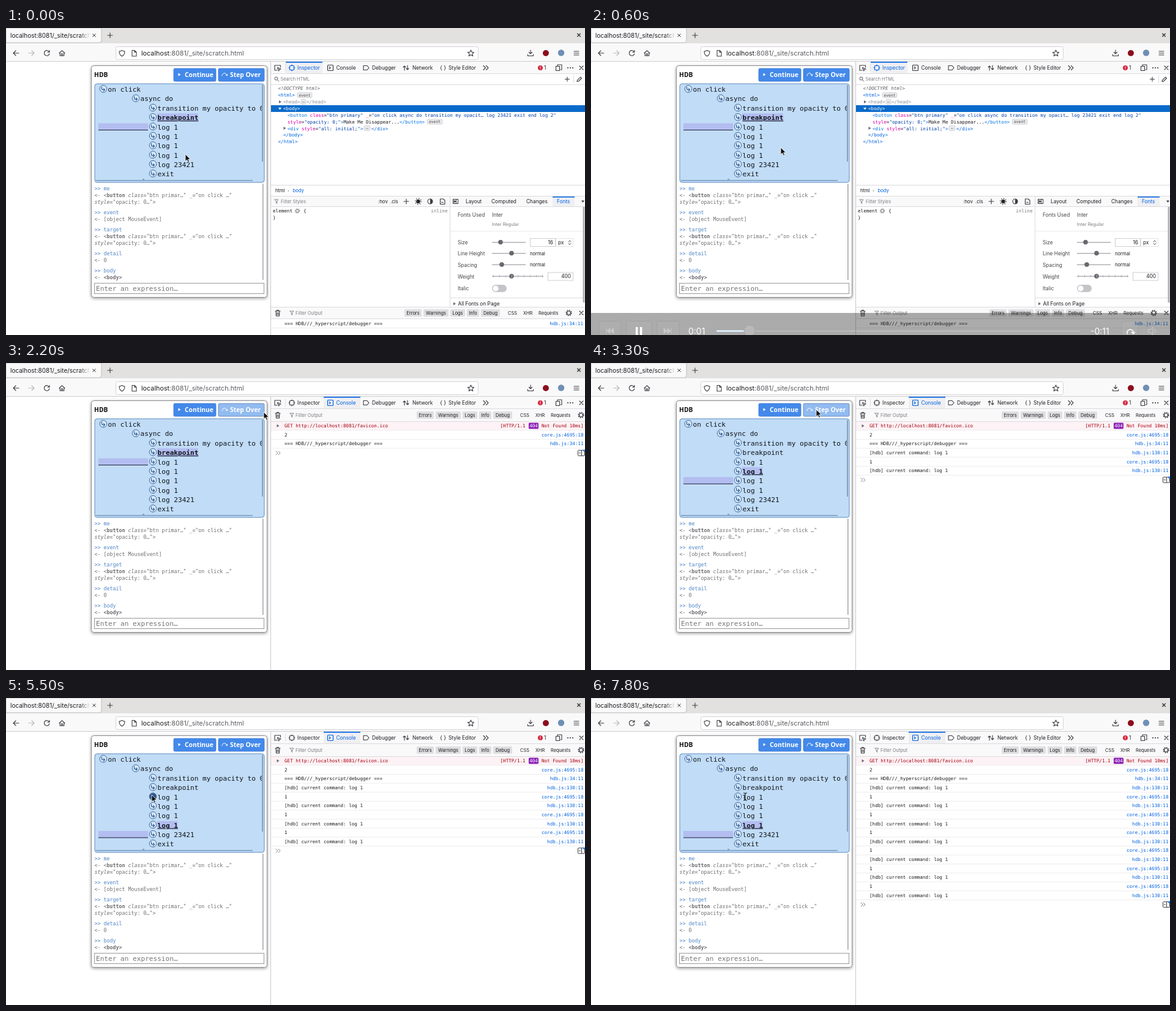
Recreate the animation shown at these times as an HTML page. Size 946 by 501 pixels, loop 8 s.

```html
<!DOCTYPE html>
<html lang="en">
<head>
<meta charset="utf-8">
<title>Debugger session</title>
<style>
html, body { margin: 0; width: 100%; height: 100%; overflow: hidden; background: #fff; }
svg { display: block; }
text { white-space: pre; font-family: Inter, sans-serif; }
.m { font-family: "DejaVu Sans Mono", monospace; }
.n { font-family: "Noto Sans", sans-serif; font-weight: 700; }
.b { font-weight: 700; }
.i { font-style: italic; }
.e { text-anchor: end; }
.c { text-anchor: middle; }
.tag { fill: #0074e8; } .attr { fill: #dd00a9; } .val { fill: #003eaa; }
.on { font-weight: 700; text-decoration: underline; }
</style>
</head>
<body>
<svg id="stage" width="946" height="501" viewBox="0 0 946 501"></svg>
<script>
const INK = '#1c1c20', GREY = '#7c7c82', LINE = '#dcdce0', BLUE = '#0061e0', BAR = '#f9f9fa';
const CODE = 11.1, LOG = 7.6, UI = 8.3, REPL = 8.3;

// y is the vertical middle of the text
const T = (x, y, size, s, fill = INK, cls = '', more = '') =>
  `<text x="${x}" y="${(y + size * .36).toFixed(2)}" font-size="${size}" fill="${fill}" class="${cls}" ${more}>${s}</text>`;
const R = (x, y, w, h, fill, more = '') => `<rect x="${x}" y="${y}" width="${w}" height="${h}" fill="${fill}" ${more}/>`;
const P = (d, stroke = '#3c3c42', w = 1.1, fill = 'none') =>
  `<path d="${d}" fill="${fill}" stroke="${stroke}" stroke-width="${w}" stroke-linecap="round" stroke-linejoin="round"/>`;
const C = (x, y, r, fill = 'none', stroke = '#3c3c42', w = 1.1) =>
  `<circle cx="${x}" cy="${y}" r="${r}" fill="${fill}" stroke="${stroke}" stroke-width="${w}"/>`;
const H = (x, y, w, fill = LINE) => R(x, y, w, 1, fill);
const G = (id, s, more = '') => `<g id="${id}" ${more}>${s}</g>`;
const S = (cls, s) => `<tspan class="${cls}">${s}</tspan>`;
const esc = s => s.replace(/</g, '&lt;').replace(/>/g, '&gt;');
const cross = (x, y, r, w = 1.1) => P(`M${x - r} ${y - r}l${2 * r} ${2 * r}m0 ${-2 * r}l${-2 * r} ${2 * r}`, '#3c3c42', w);
const plus = (x, y, r = 4) => P(`M${x - r} ${y}h${2 * r}M${x} ${y - r}v${2 * r}`);
const tri = (x, y, fill = '#6a6a70') => `<path d="M${x} ${y - 2.5}l4 2.5l-4 2.5z" fill="${fill}"/>`;
const triDown = (x, y, fill) => `<path d="M${x} ${y - 1.5}h5l-2.5 3.5z" fill="${fill}"/>`;
const funnel = (x, y) => P(`M${x} ${y - 3}h6l-2.3 3v3.4l-1.4-1v-2.4z`, GREY, .9);
const trash = (x, y) => P(`M${x - 4} ${y - 3}h8M${x - 1.5} ${y - 3}v-1.5h3v1.5M${x - 3} ${y - 3}l.5 8h5l.5-8M${x - 1} ${y - .5}v3.5m2-3.5v3.5`);
const gear = (x, y, r = 3, w = 1.5) => C(x, y, r, 'none', '#3c3c42', w * .8) +
  `<circle cx="${x}" cy="${y}" r="${r + 1.4}" fill="none" stroke="#3c3c42" stroke-width="${w}" stroke-dasharray="${(r + 1.4) * .393} ${(r + 1.4) * .393}"/>`;

function browser() {
  return R(0, 0, 946, 55, BAR) + R(0, 0, 946, 25, '#e2e1df') +
    `<path d="M0 0H156V20q0 4-4 4H0z" fill="${BAR}" stroke="#c0c0c2"/>` +
    T(7, 12, 10, 'localhost:8081/_site/scratch', INK, '', 'clip-path="url(#tabClip)"') +
    R(120, 3, 18, 18, 'url(#fade)') + cross(144, 12, 2.3, 1) + plus(170, 12) + cross(936, 11.5, 2.3, 1.5) +
    P('M21 41h-9m4-4l-4 4l4 4') + P('M37 41h9m-4-4l4 4l-4 4', '#b8b8bc') +
    P('M70.6 39a4.3 4.3 0 1 0 .3 3M71 36.5v3h-3') + P('M87 41l4.5-4.2L96 41M88.2 40.3v5h6.6v-5M90.5 45v-3h2v3') +
    R(179.5, 30.5, 592, 21, '#fff', 'rx="3" stroke="#d4d4d8"') +
    P('M189.5 36.5q2.5 1.6 4.5 1.6q0 6-4.5 8q-4.5-2-4.5-8q2 0 4.5-1.6z') +
    P('M206 36.5h4l3 3v6.5h-7zM210 36.5v3h3') + T(221, 41, 10.8, 'localhost<tspan fill="#5c5c62">:8081/_site/scratch.html</tspan>') +
    P('M759.5 36l1.5 3.4l3.7.3l-2.8 2.4l.9 3.6l-3.3-2l-3.3 2l.9-3.6l-2.8-2.4l3.7-.3z') +
    P('M857 36v6m-2.6-2.5l2.6 2.6l2.6-2.6M852.5 43v2.5h9v-2.5') +
    C(882, 41, 5, '#8c0d1c', 'none') + C(907, 40.5, 5.2, '#6f8fb5', 'none') +
    P('M928 38h8m-8 3h8m-8 3h8') + H(0, 54, 946, '#cfcfd3');
}

const CODE_ROWS = ['on click', 'async do', 'transition my opacity to 0', 'breakpoint', 'log 1', 'log 1', 'log 1', 'log 1', 'log 23421', 'exit'];
const rowY = i => 99.8 + i * 15.35;

function codeRow(s, i) {
  const x = i ? i > 1 ? 240 : 212 : 159, y = rowY(i);
  return `<circle id="dot${i}" cx="${x}" cy="${y - .5}" r="5.8" fill="#d3e6f9" stroke="#40699c"/>` +
    P(`M${x - 2.5} ${y - 3.5}v2.5q0 2 2 2h3m-2-2l2 2l-2 2`, '#2f5a90') +
    T(x + 7.6, y + .3, CODE, s, '#10151c', 'm', `id="row${i}"`);
}

function repl() {
  const out = (y, s) => T(144.5, y, REPL, s, '#6f6f74', 'm');
  const ask = (y, s) => T(144.5, y, REPL, '&gt;&gt; ' + s, '#4d85c6', 'm');
  const btn = y => out(y, `&lt;- &lt;${S('b', 'button')} ${S('i', 'class')}="btn primar…" _="on click …"`) +
    out(y + 11, `${S('i', 'style')}="opacity: 0…"&gt;`);
  return ask(262.5, 'me') + btn(273.5) + ask(301.5, 'event') + out(312.5, '&lt;- [object MouseEvent]') +
    ask(329.3, 'target') + btn(340.3) + ask(368, 'detail') + out(379, '&lt;- 0') +
    ask(396, 'body') + out(407, `&lt;- ${S('b', '&lt;body&gt;')}`);
}

function hdb() {
  return R(139.5, 61.5, 287, 378, '#fff', 'rx="4" stroke="#8d8d90" filter="url(#shadow)"') +
    T(144, 76, 10.3, 'HDB', '#111', 'n') +
    R(274, 66, 69, 21, '#4389ea', 'rx="2" stroke="#3c78cc" stroke-width=".8"') +
    tri(281.5, 76, '#fff') + T(292, 76.5, 10.3, 'Continue', '#fff', 'n') +
    R(347, 66, 75, 21, '#4389ea', 'id="step" rx="2" stroke="#3c78cc" stroke-width=".8"') +
    P('M353 78a4 4 0 0 1 8-.5m-2-1l2.2 1.6l1-2.4', '#fff', 1) + T(366, 76.5, 10.3, 'Step Over', '#fff', 'n') +
    R(145, 91, 277, 161, '#c1dcf6', 'rx="4" stroke="#5d8cc0"') +
    G('hl', R(151, 9.7, 81, 11.5, '#b3bdf0') + H(151, 20.2, 81, '#20243c') + R(247, -6.5, 10, 13, '#b3bdf0', 'id="mark"')) +
    G('rows', CODE_ROWS.map(codeRow).join(''), 'clip-path="url(#codeClip)"') +
    R(418, 93, 2, 125, '#879fba') + R(147, 248, 256, 1.6, '#7d9dc2') + R(223, 246.5, 3, 1, '#4c6f9c') +
    repl() + R(419, 254, 1.6, 157, '#a5a9ae') +
    R(144.5, 416.5, 277, 17, '#fff', 'stroke="#9a9a9e"') + T(147, 425, CODE, 'Enter an expression…', '#75757a', 'm');
}

function filterBar(y, dx) {
  const chips = [['Errors', 671, 28], ['Warnings', 702, 41], ['Logs', 746, 24], ['Info', 773, 20], ['Debug', 796, 31]];
  const plain = [['CSS', 840], ['XHR', 865], ['Requests', 890]];
  return trash(444, y) + funnel(464, y) + T(473, y, 7.5, 'Filter Output', GREY) +
    chips.map(([s, x, w]) => R(x - dx, y - 6, w, 12, '#dfdfe2', 'rx="1.5"') + T(x - dx + w / 2, y, 7.4, s, INK, 'c')).join('') +
    plain.map(([s, x]) => T(x - dx, y, 7.4, s)).join('') + gear(939.5 - dx, y);
}

function toolbar() {
  return R(433, 55, 513, 446, '#fff') + R(433, 55, 513, 19, BAR) + H(433, 74, 513) + R(432, 55, 1, 446, '#c9c9ce') +
    P('M443 69h-4v-8h9.5v3M443.5 64.5l5.5 2.3l-2.4.9l-.9 2.4z') + R(456, 58, 1, 13, LINE) +
    G('tab', R(0, 55, 60, 19, '#efeff2') + R(0, 55, 60, 1.7, '#0a6ae8')) +
    G('inspIcon', R(463.5, 61.5, 7, 7, 'none', 'rx="1" stroke-width="1.2"') +
      '<path d="M467 59.5v2m0 7v2m-5.5-5.5h2m7 0h2" stroke-width="1.2"/>') +
    T(476, 65, UI, 'Inspector', INK, '', 'id="inspTab"') +
    G('consIcon', R(525.5, 60.5, 9, 9, 'none', 'rx="1" stroke-width="1.2"') + '<path d="M528 63l2 2l-2 2" fill="none" stroke-width="1.2"/>') +
    T(539.5, 65, UI, 'Console', INK, '', 'id="consTab"') +
    P('M584 61.5h6l3 3.5l-3 3.5h-6z') + T(598, 65, UI, 'Debugger') +
    P('M651 69v-7m-2 2l2-2l2 2M656 61v7m-2-2l2 2l2-2') + T(664, 65, UI, 'Network') +
    T(709, 64.5, 9, '{ }') + T(723, 65, UI, 'Style Editor') + P('M780 61.5l3.5 3.5l-3.5 3.5m4.5-7l3.5 3.5l-3.5 3.5') +
    C(873, 65, 4, '#d7263d', 'none') + R(872.5, 62.5, 1, 3, '#fff') + R(872.5, 66.3, 1, 1, '#fff') + T(879, 65, UI, '1') +
    P('M901 62v-2h7v8h-2M898.5 62.5h6v7h-6z') + [918, 922, 926].map(x => C(x, 65, 1.1, '#3c3c42', 'none')).join('') + cross(940, 65, 3);
}

function tree() {
  const row = (x, i, s, fill = BLUE, cls = '') => T(x, 98.2 + i * 10.93, LOG, s, fill, 'm ' + cls);
  const tag = s => S('tag', esc(s)), at = (n, v) => S('attr', n) + '=' + S('val', `"${v}"`);
  const badge = (x, y, w, s) => R(x, y - 4, w, 8, '#ececef', 'rx="2" stroke="#c4c4ca" stroke-width=".7"') + T(x + w / 2, y - .2, 6.4, s, '#444', 'c m');
  return R(433, 126, 513, 11, '#0a6aca') +
    row(444.5, 0, '&lt;!DOCTYPE html&gt;', '#5c5c62', 'i') + row(444.5, 1, '&lt;html&gt;') + badge(476, 109.5, 24, 'event') +
    tri(446, 120.5) + row(453, 2, '&lt;head&gt;', '#8a8f99') + badge(482, 120.5, 8, '⋯') + row(491, 2, '&lt;/head&gt;', '#8a8f99') +
    triDown(445, 131.5, '#fff') + row(453, 3, '&lt;body&gt;', '#fff') +
    row(460, 4, `${tag('<button')} ${at('class', 'btn primary')} ${at('_', 'on click async do transition my opacit… log 23421 exit end log 2')}`, INK) +
    row(460, 5, `${at('style', 'opacity: 0;')}${tag('>')}Make Me Disappear...${tag('</button>')}`, INK) + badge(688, 153, 25, 'event') +
    tri(453.5, 163.5) + row(460, 6, `${tag('<div')} ${at('style', 'all: initial;')}${tag('>')}`, INK) + badge(585, 163.5, 10, '⋯') + row(597, 6, '&lt;/div&gt;') +
    row(453, 7, '&lt;/body&gt;') + row(444.5, 8, '&lt;/html&gt;');
}

function fontsPane() {
  const slider = (y, knob, w) => R(794, y - 1, w, 1.6, '#b4b4ba') + C(knob, y - .5, 3.8, '#68686e', 'none');
  const label = (y, s) => T(738, y, UI, s, '#45454a');
  const field = (x, y, w, s) => R(x + .5, y - 6.5, w, 13, '#fff', 'stroke="#cfcfd4"') + T(x + w - 3, y, UI, s, INK, 'e');
  const ticks = Array.from({ length: 9 }, (_, i) => R(796 + i * 10, 403, 1, 4, '#b4b4ba')).join('');
  return R(725, 274, 1, 181, LINE) + R(726, 275, 220, 16, BAR) + R(893, 275, 36, 16, '#efeff2') + R(893, 275, 36, 1.6, '#0a6ae8') +
    R(730.5, 279.5, 8, 7, 'none', 'stroke="#3c3c42"') + R(735, 280, 1, 6, '#3c3c42') + tri(731.7, 283, '#3c3c42') +
    T(751, 283.5, UI, 'Layout') + T(793, 283.5, UI, 'Computed') + T(850, 283.5, UI, 'Changes') + T(900, 283.5, UI, 'Fonts', BLUE) +
    triDown(940, 283, '#3c3c42') + H(726, 291, 220) +
    label(305.5, 'Fonts Used') + T(794, 305.5, UI, 'Inter', '#45454a') + T(794, 320, 7.3, 'Inter Regular', GREY) + H(726, 331, 217, '#ebebee') +
    label(350.5, 'Size') + slider(350, 808, 55) + field(856, 350, 41, '16') + R(898.5, 343.5, 28, 13, '#fff', 'stroke="#e4e4e8"') +
    T(902, 350.5, UI, 'px') + P('M919 349l2-2.2l2 2.2m-4 2.4l2 2.2l2-2.2', '#3c3c42', .9) +
    label(368.5, 'Line Height') + slider(368, 826, 55) + T(856, 368, 7.6, 'normal') +
    label(387, 'Spacing') + slider(386.5, 810, 55) + T(856, 386.5, 7.6, 'normal') +
    label(406, 'Weight') + slider(405.5, 826, 84) + ticks + field(885, 405.5, 41, '400') +
    label(425, 'Italic') + R(794, 419, 24, 12, '#c4c4c9', 'rx="6"') + C(800, 425, 4.6, '#fff', 'none') +
    H(726, 440, 217) + tri(731, 450) + T(738.5, 450.5, UI, 'All Fonts on Page') + R(942.5, 292, 3, 156, '#b0b0b5');
}

function inspector() {
  return C(441.5, 82.5, 2.4, 'none', GREY) + P('M443.5 84.5l2.3 2.5', GREY) + T(448.5, 83.7, 7.4, 'Search HTML', GREY) +
    plus(917, 83.5, 3.5) + R(927, 77, 1, 13, LINE) + P('M933 87.5l.6-2.3l5-5l1.8 1.8l-5 5z') + H(433, 92, 513) + tree() +
    H(433, 256, 513) + T(440, 265.3, 7.6, 'html') + T(460, 265, 7, '›', GREY) + T(468.5, 265.3, 7.6, 'body', BLUE) + H(433, 274, 513) +
    R(433, 275, 292, 16, BAR) + funnel(439, 283) + T(449, 283.3, 7.4, 'Filter Styles', GREY) + T(608, 283, 7.8, ':hov') + T(628, 283, 7.8, '.cls') +
    plus(654, 283) + C(673.5, 283, 2.8, '#222') + `<circle cx="673.5" cy="283" r="4.8" fill="none" stroke="#222" stroke-width="1.4" stroke-dasharray="1.2 2.57"/>` +
    C(693, 283, 4) + '<path d="M693 279a4 4 0 0 1 0 8z" fill="#3c3c42"/>' + P('M709.5 279h5l2.5 2.5v6h-7.5zM711.5 284.5h3') + H(433, 291, 292) +
    T(436, 298.5, LOG, 'element', INK, 'm') + gear(476, 298.5, 2.2, .9) + T(486, 298.5, LOG, '{', INK, 'm') +
    T(721.5, 298.5, LOG, 'inline', GREY, 'm e') + T(436, 309.5, LOG, '}', INK, 'm') + fontsPane() +
    R(433, 455, 513, 46, '#fff') + R(433, 456, 513, 18, BAR) + H(433, 455, 513) + filterBar(465, 20) + cross(940, 465, 3) + H(433, 474, 513) +
    T(455, 482, LOG, '=== HDB///_hyperscript/debugger ===', INK, 'm') + T(943, 482, LOG, 'hdb.js:34:11', BLUE, 'm e') + H(433, 489, 513, '#ededf0');
}

const LOG_ROWS = 16, logY = i => 102.4 + i * 14.63;

function logRow(i) {
  const y = logY(i), line = H(433, y + 7, 513, '#ededf0');
  const pair = (s, link) => T(455, y, LOG, s, INK, 'm') + T(943.5, y, LOG, link, BLUE, 'm e');
  const red = (x, s, cls = '') => T(x, y, LOG, s, '#a4000f', 'm ' + cls);
  let s;
  if (!i) s = R(433, 96, 513, 13.5, '#fdf2f5') + tri(442.5, y) + red(455, 'GET http://localhost:8081/favicon.ico') +
    red(807.5, '[HTTP/1.1') + R(854, y - 5, 16, 10, '#8a1fb8', 'rx="1.5"') + T(862, y, LOG, '404', '#fff', 'm c') +
    red(943.5, 'Not Found 10ms]', 'e');
  else if (i === 1) s = pair('2', 'core.js:4695:18');
  else if (i === 2) s = pair('=== HDB///_hyperscript/debugger ===', 'hdb.js:34:11');
  else s = i % 2 ? pair('[hdb] current command: log 1', 'hdb.js:130:11') : pair('1', 'core.js:4695:18');
  return G('log' + i, s + line);
}

function consolePane() {
  return R(433, 75, 513, 20, BAR) + filterBar(85, 0) + H(433, 95, 513) +
    Array.from({ length: LOG_ROWS }, (_, i) => logRow(i)).join('') +
    G('prompt', P('M441 -3l3 3l-3 3m4-6l3 3l-3 3', '#85858c', 1) +
      R(934.5, -4.5, 11, 9, '#fff', 'rx="1" stroke="#3c3c42"') + R(940, -4, 1, 8, '#3c3c42') + P('M936.5 0h2', '#3c3c42', 1) + C(944.5, -4, 1.6, '#0a84ff', 'none'));
}

function player() {
  const box = (x, w) => R(x, 478.5, w, 28, '#2e2e2e', 'stroke="#0c0c0c" rx="2"');
  const skip = (x, dir) => `<g transform="translate(${x} 494.500) scale(${dir} 1)">` +
    P('M-6 -4v8M0 -4v8l-5-4zM6 -4v8l-5-4z', '#777', .8, '#777') + '</g>';
  return R(0, 465, 946, 36, '#262624') + box(13, 35) + box(58, 41) + box(108, 36) + box(867, 27) +
    skip(31, 1) + R(73, 488, 3.5, 13, '#fff') + R(80, 488, 3.5, 13, '#fff') + skip(125, -1) +
    T(159, 494.5, 14, '0:01', '#fff') + T(816, 494.5, 14, '-0:11', '#fff') +
    R(205, 492.5, 595, 4, '#444', 'stroke="#111" stroke-width=".8"') + R(205, 493, 54, 3, '#9cc8ee', 'id="played"') +
    '<circle id="knob" cy="494" r="9" fill="#4a4a4a" stroke="#151515"/>' +
    P('M876 499v-2a5 5 0 0 1 10 0v2m-2.5-2.5l2.5 2.5l2.5-2.5', '#fff', 1.6) + P('M911 492h3l4-4v13l-4-4h-3zM921 491q3 3.500 0 7', '#777', 1);
}

const stage = document.getElementById('stage');
stage.innerHTML = `<defs>
  <clipPath id="tabClip"><rect width="138" height="24"/></clipPath>
  <clipPath id="codeClip"><rect x="146" y="92" width="272" height="159"/></clipPath>
  <linearGradient id="fade"><stop stop-color="${BAR}" stop-opacity="0"/><stop offset="1" stop-color="${BAR}"/></linearGradient>
  <filter id="shadow" x="-10%" y="-10%" width="120%" height="120%"><feDropShadow dx="0" dy="1.5" stdDeviation="2.5" flood-opacity=".4"/></filter>
</defs>` + R(0, 0, 946, 501, '#fff') + browser() + hdb() + toolbar() + G('insp', inspector()) + G('cons', consolePane()) + G('player', player()) +
  G('arrow', '<path d="M0 0V11.500L2.700 9.100L4.500 13.200L6.500 12.300L4.700 8.300H8.300Z" fill="#111" stroke="#fff" stroke-width=".8"/>') +
  G('beam', P('M-2.5 -6q2.500 0 2.500 1.500v9q0 1.500 -2.500 1.500M2.500 -6q-2.500 0 -2.500 1.500M2.500 6q-2.500 0 -2.500 -1.500', '#111', 1.1));

const el = Object.fromEntries([...stage.querySelectorAll('[id]')].map(n => [n.id, n]));
const set = (id, name, v) => el[id].setAttribute(name, v);
const show = (id, on) => { el[id].style.display = on ? '' : 'none'; };

// time, x, y
const POINTER = [[0, 293, 206], [600, 310, 195], [900, 372, 95], [1000, 411, 88], [1100, 411, 88], [1600, 548, 66], [2000, 548, 66],
  [2200, 421, 80], [2700, 368, 76], [4600, 368, 76], [5100, 340, 95], [5500, 238, 158], [5700, 238, 158], [6300, 363, 76],
  [7300, 363, 76], [7500, 340, 92], [7800, 252, 161]];
// time, current code row, console rows
const STEPS = [[0, 3, 3], [2600, 4, 4], [3200, 5, 6], [3800, 6, 8], [4400, 7, 10], [5700, 4, 10], [6500, 5, 10], [6600, 5, 12], [6900, 6, 14], [7200, 7, 16]];
const FADE = [[0, 0], [200, .38], [600, .38], [900, 0]];

function at(keys, t) {
  const j = keys.findIndex(k => k[0] > t);
  if (j < 0) return keys[keys.length - 1].slice(1);
  const a = keys[j - 1], b = keys[j], p = (t - a[0]) / (b[0] - a[0]);
  return a.slice(1).map((v, i) => v + (b[i + 1] - v) * p);
}

function draw(t) {
  const [x, y] = at(POINTER, t), [, cur, logs] = STEPS.filter(s => s[0] <= t).pop();
  const cons = t >= 1700, beam = t >= 7700;
  show('insp', !cons);
  show('cons', cons);
  set('tab', 'transform', `translate(${cons ? 519 : 457})`);
  for (const [id, on] of [['insp', !cons], ['cons', cons]]) {
    set(id + 'Tab', 'fill', on ? BLUE : INK);
    set(id + 'Icon', 'stroke', on ? BLUE : '#3c3c42');
  }
  set('hl', 'transform', `translate(0 ${rowY(cur)})`);
  set('mark', 'width', CODE_ROWS[cur].length * 6.68);
  CODE_ROWS.forEach((_, i) => el['row' + i].classList.toggle('on', i === cur));
  for (let i = 0; i < LOG_ROWS; i++) show('log' + i, i < logs);
  set('prompt', 'transform', `translate(0 ${logY(logs - 1) + 15.2})`);
  const hover = x > 347 && x < 422 && y > 66 && y < 87;
  set('step', 'fill', hover ? '#92bbf0' : '#4389ea');
  set('step', 'stroke', hover ? '#5b7fae' : '#3c78cc');
  set('dot4', 'fill', Math.hypot(x - 240, y - rowY(4)) < 6 && !beam ? '#35598a' : '#d3e6f9');
  show('arrow', !beam);
  show('beam', beam);
  set(beam ? 'beam' : 'arrow', 'transform', `translate(${x} ${y})`);
  const knob = 259 + (t - 600) * .05;
  set('player', 'opacity', at(FADE, t)[0]);
  set('played', 'width', knob - 205);
  set('knob', 'cx', knob);
}

function tick() {
  draw(Math.floor(performance.now() % 8000 / 100) * 100);
  requestAnimationFrame(tick);
}
tick();
</script>
</body>
</html>
```
